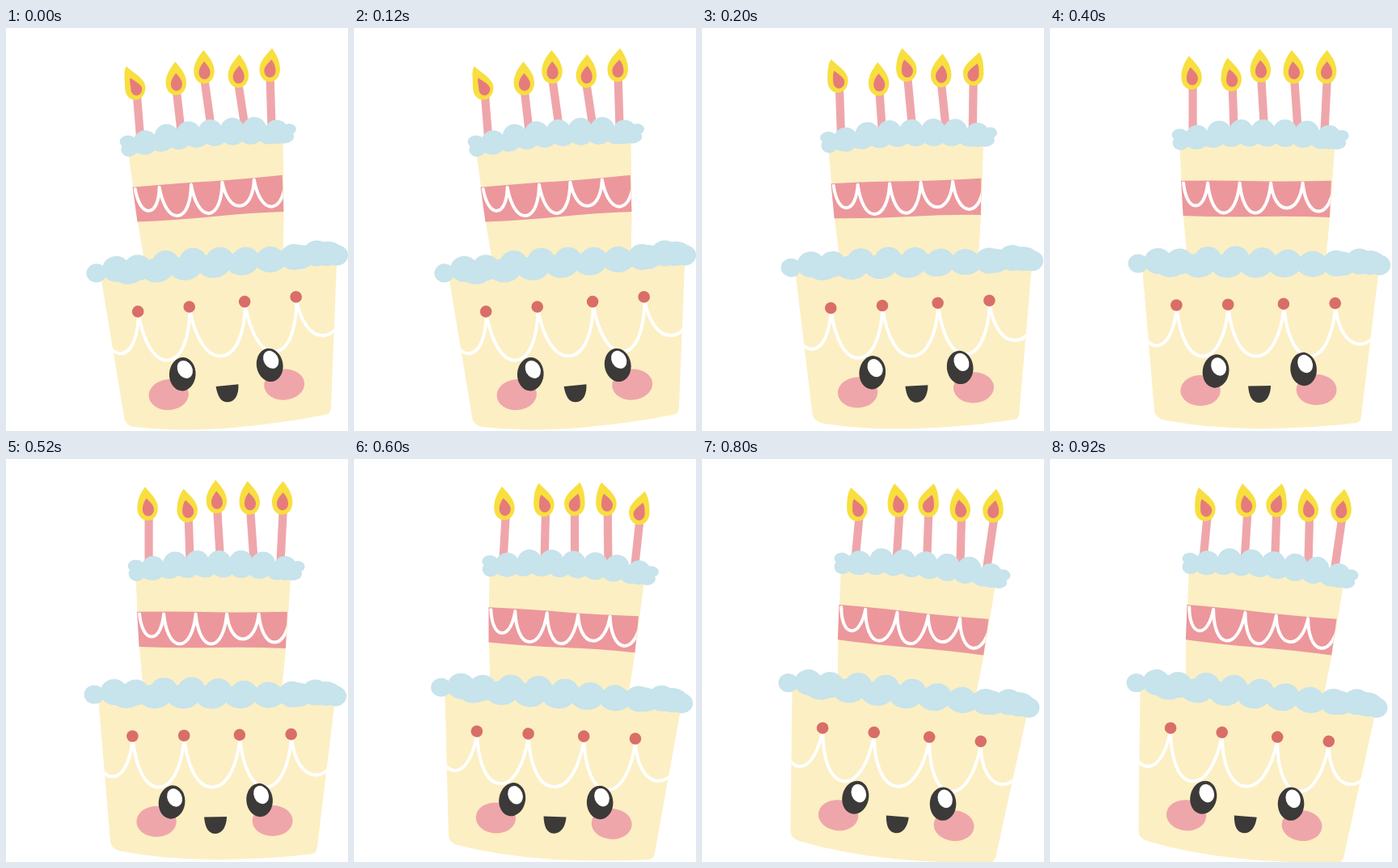
Write an HTML page that moves like this. It is 423 px wide and 498 px high and loops after 1000 ms.

```html
<!DOCTYPE html>
<html lang="en">
<head>
<meta charset="utf-8">
<title>Swaying birthday cake</title>
<style>
  html, body { margin: 0; width: 100%; height: 100%; overflow: hidden; background: #fff; }
  svg { display: block; width: 100%; height: 100%; }
  .cream { fill: #fcefc3; }
  .icing { fill: #c7e3eb; }
  .rose { fill: #ec979c; }
  .blush { fill: #efa6aa; }
  .dark { fill: #3b3a38; }
  .white { fill: #fff; }
  .dot { fill: #d96e68; }
  .line { fill: none; stroke: #fff; stroke-width: 4; stroke-linecap: round; stroke-linejoin: round; }
  .stick { stroke: #efa6aa; stroke-width: 10.2; }
  .flame { fill: #f8df3f; }
  .core { fill: #e67b7c; }
</style>
</head>
<body>
<svg viewBox="0 0 423 498">
  <defs>
    <clipPath id="baseClip"><path id="baseShape" d="M113 290 L128.500 473 Q129.500 482 141 484.500 Q195 495 258 495 Q325 494.500 378 488 Q383 487 384 482 L407 292 Z"/></clipPath>
    <clipPath id="bandClip"><path id="bandShape" d="M161.500 188.800 Q215 188 258 189.300 Q300 190 347.300 188.800 L345.300 234 Q300 232 258 233 Q210 234 164 232 Z"/></clipPath>
  </defs>
  <g transform="translate(.6 0)">
    <g id="candles"></g>
    <g id="cake">
      <path class="cream" d="M159.500 140 L162 189 L164.500 233 L169.500 290 L340 290 L345.700 233 L352 140 Z"/>
      <use href="#bandShape" class="rose"/>
      <path id="topSwag" class="line" clip-path="url(#bandClip)"/>
      <g id="topIcing" class="icing">
        <ellipse cx="160" cy="132" rx="10" ry="7.500"/>
        <ellipse cx="161" cy="142" rx="10" ry="9"/>
        <ellipse cx="360" cy="133" rx="9" ry="7"/>
        <ellipse cx="354" cy="142" rx="11.500" ry="8"/>
      </g>
      <use href="#baseShape" class="cream"/>
      <path id="baseSwag" class="line" clip-path="url(#baseClip)"/>
      <g id="dots" class="dot"></g>
      <g id="baseIcing" class="icing">
        <ellipse cx="108.500" cy="291" rx="12.500" ry="11.500"/>
        <ellipse cx="133" cy="288" rx="17" ry="16"/>
        <ellipse cx="407" cy="293" rx="13.500" ry="12.500"/>
      </g>
      <ellipse class="blush" cx="185.500" cy="448" rx="24.700" ry="19"/>
      <ellipse class="blush" cx="329" cy="447" rx="25" ry="19"/>
      <ellipse class="dark" cx="204.500" cy="424" rx="16.300" ry="20.700" transform="rotate(8 204.500 424)"/>
      <ellipse class="dark" cx="313" cy="421.500" rx="16.300" ry="20.700" transform="rotate(-5 313 421.500)"/>
      <ellipse class="white" cx="208" cy="418.500" rx="9" ry="11.500" transform="rotate(-24 208 418.500)"/>
      <ellipse class="white" cx="315" cy="415" rx="9" ry="11.500" transform="rotate(-24 315 415)"/>
      <path class="dark" d="M244.500 442.500 L272.500 442 C272 455 266.500 463 258 463 C249.500 463 245.500 455 244.500 442.500 Z"/>
    </g>
  </g>
</svg>
<script>
const NS = 'http://www.w3.org/2000/svg';
const TAU = 2 * Math.PI;
const byId = id => document.getElementById(id);

const STEP = 200;
const PIVOT = { x: 257, y: 262 };
const FOOT_Y = 126;
const FLAME = 41.5;
const ANGLES = [-4.6, -2, 0, 3.35, 5.5];

// Each candle stands at x and drifts sideways as it rises; its top bobs and
// its flame leans, both as waves of [middle, swing, phase].
const CANDLES = [
  { x: 176, drift: 0, beat: 1, top: [79.7, 4, -1.02], lean: [-6.5, 4.3, -3.07] },
  { x: 227, drift: -.035, beat: 1, top: [77.5, 5.1, 1.08], lean: [-3.4, 2.9, .54] },
  { x: 264.5, drift: -.06, beat: 1, top: [68.4, 2.1, -1.56], lean: [1.1, 6.4, -1.85] },
  { x: 306, drift: -.07, beat: 1, top: [72, 5.1, .25], lean: [-1.7, 3.9, .76] },
  { x: 339, drift: .05, beat: 2, top: [72.2, 3.9, 1.45], lean: [4.3, 3.3, 2.05] }
];

function set(node, attrs) {
  for (const key in attrs) node.setAttribute(key, attrs[key]);
}

function add(id, tag, attrs) {
  const node = document.createElementNS(NS, tag);
  set(node, attrs);
  return byId(id).appendChild(node);
}

// A row of equal blobs; place maps 0..1 to a centre.
function row(id, count, rx, ry, place) {
  for (let i = 0; i < count; i++) {
    const [cx, cy] = place(i / (count - 1));
    add(id, 'ellipse', { cx, cy, rx, ry });
  }
}

// Icing thread hung from peaks, sagging by one depth per gap.
function swag(id, peaks, top, depths) {
  let d = `M${peaks[0]} ${top}`;
  depths.forEach((h, i) => {
    const a = peaks[i], b = peaks[i + 1], w = (b - a) / 2;
    const low = top + h, bend = top + .55 * h;
    d += `C${a + .1 * w} ${bend} ${a + .45 * w} ${low} ${a + w} ${low}`
      + `C${b - .45 * w} ${low} ${b - .1 * w} ${bend} ${b} ${top}`;
  });
  byId(id).setAttribute('d', d);
}

function drop(x, tipX, tipY, bottom, half) {
  const h = bottom - tipY, w = half * h, mid = bottom - .38 * h;
  const l = x - w, r = x + w;
  return `M${tipX} ${tipY}
    C${tipX + .1 * h} ${tipY + .13 * h} ${r} ${mid - .26 * h} ${r} ${mid}
    C${r} ${bottom - .15 * h} ${x + .56 * w} ${bottom} ${x} ${bottom}
    C${x - .56 * w} ${bottom} ${l} ${bottom - .15 * h} ${l} ${mid}
    C${l} ${mid - .26 * h} ${tipX - .1 * h} ${tipY + .13 * h} ${tipX} ${tipY}Z`;
}

function turn(x, y, deg) {
  const a = deg * TAU / 360, c = Math.cos(a), s = Math.sin(a);
  const dx = x - PIVOT.x, dy = y - PIVOT.y;
  return [PIVOT.x + dx * c - dy * s, PIVOT.y + dx * s + dy * c];
}

const wave = ([middle, swing, phase], turns) => middle + swing * Math.cos(TAU * turns - phase);

const hooks = [106, 156.2, 220, 288.7, 352.5, 413];
swag('baseSwag', hooks, 345.5, [47, 60, 60, 60, 45]);
swag('topSwag', [164.5, 194.5, 234, 272.5, 312, 351], 191.5, [28, 37, 37, 31, 35]);
for (const x of hooks.slice(1, -1)) add('dots', 'circle', { cx: x - .4, cy: 342.5 - .012 * (x - hooks[1]), r: 7.3 });

row('topIcing', 7, 15, 15, t => [181.5 + 163 * t, 128 + 7 * (2 * t - 1) ** 4]);
row('topIcing', 8, 14, 11, t => [179 + 156 * t, 135.5 + 3 * (2 * t - 1) ** 2]);
row('baseIcing', 8, 17, 16, t => [160 + 222 * t + 7 * Math.sin(Math.PI * t), 288.5 - 3 * Math.sin(TAU * t)]);
row('baseIcing', 8, 20, 15, t => [148 + 247 * t, 293 + 2 * Math.sin(Math.PI * t) - 3 * t]);

const lights = CANDLES.map(candle => ({
  candle,
  stick: add('candles', 'line', { class: 'stick' }),
  flame: add('candles', 'path', { class: 'flame' }),
  core: add('candles', 'path', { class: 'core' })
}));

function draw(time) {
  const pose = Math.floor(time / STEP) % ANGLES.length;
  const angle = ANGLES[pose];
  byId('cake').setAttribute('transform', `rotate(${angle} ${PIVOT.x} ${PIVOT.y})`);
  for (const { candle, stick, flame, core } of lights) {
    const turns = candle.beat * pose / ANGLES.length;
    const top = wave(candle.top, turns), lean = wave(candle.lean, turns);
    const at = y => turn(candle.x + candle.drift * (FOOT_Y - y), y, angle);
    const [x1, y1] = at(FOOT_Y), [x2, y2] = at(top - 6), [wickX, bottom] = at(top);
    set(stick, { x1, y1, x2, y2 });

    const x = wickX - 1 + .15 * lean, tipY = bottom - FLAME;
    set(flame, { d: drop(x, x + lean, tipY, bottom, .307) });
    set(core, { d: drop(x + .5 - .1 * lean, x + .5 + .58 * lean, tipY + .34 * FLAME, bottom - .13 * FLAME, .32) });
  }
}

function tick() {
  draw(performance.now());
  requestAnimationFrame(tick);
}
tick();
</script>
</body>
</html>
```
